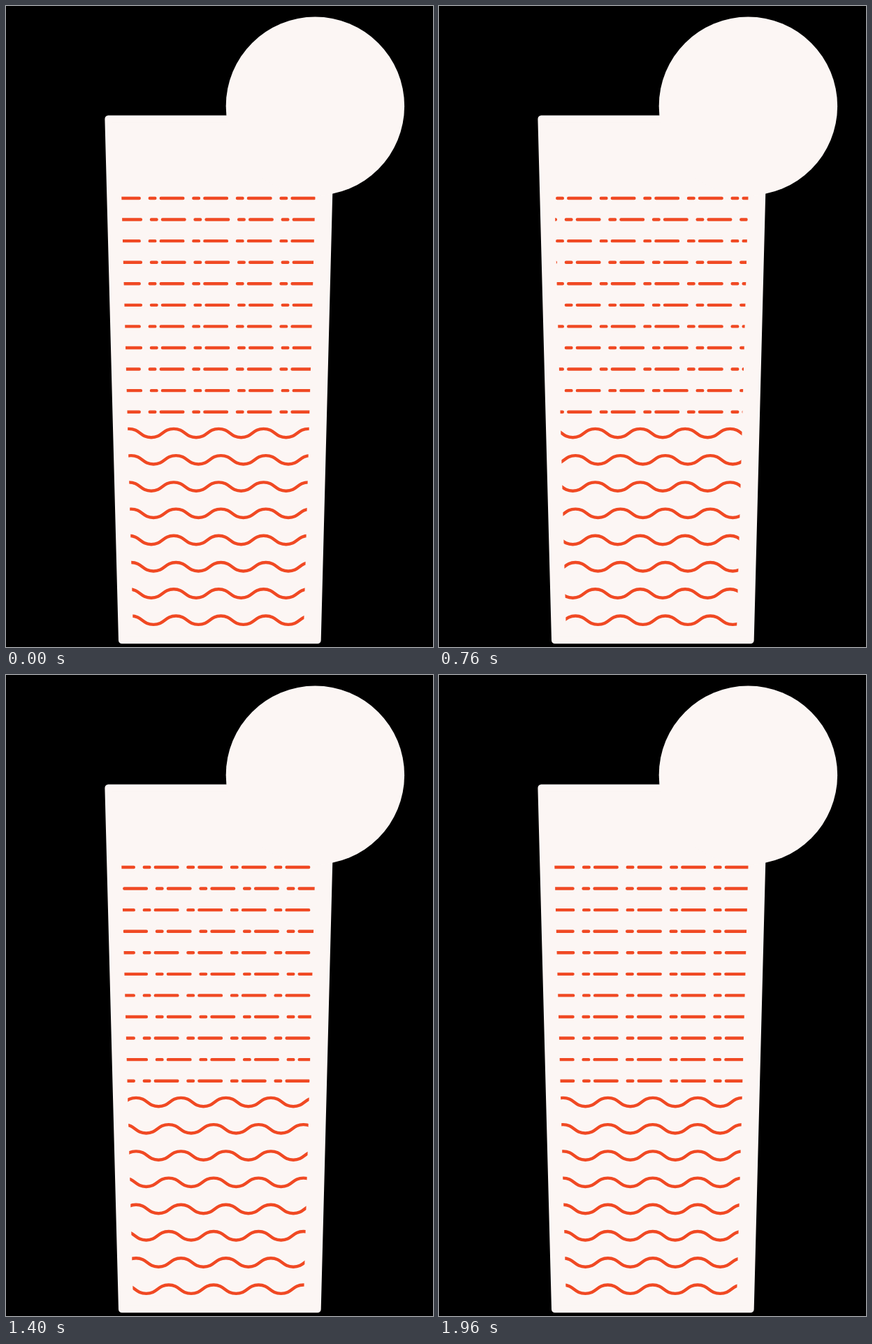
An HTML page with a canvas that plays this animation: 611x917 px, repeating every 2000 ms.

```html
<!DOCTYPE html>
<html lang="en">
<head>
<meta charset="utf-8">
<title>Fizzy glass</title>
<style>
html, body { margin: 0; width: 100%; height: 100%; overflow: hidden; background: #000; }
canvas { display: block; }
</style>
</head>
<body>
<canvas id="stage" width="611" height="917"></canvas>
<script>
const ctx = document.getElementById('stage').getContext('2d');
const CREAM = '#fcf6f4', ORANGE = '#f04923';
const LOOP = 2000, STEP = 40, WIDTH = 4.4;
const DASH = { pattern: [31.6, 15, 7.6, 8.4], period: 62.6, x: 220.65, start: 1.1, speed: 21.69 };
const WAVE = { period: 64.3, x: 241.6, start: 1.6, speed: 14.4, height: 6.2 };

function polygon(points) {
  ctx.beginPath();
  points.forEach(([x, y]) => ctx.lineTo(x, y));
  ctx.closePath();
}

function drawGlass() {
  ctx.fillStyle = ctx.strokeStyle = CREAM;
  ctx.lineJoin = 'round';
  ctx.lineWidth = 10;
  polygon([[146.4, 161.5], [465, 161.5], [445.7, 907.3], [166, 907.3]]);
  ctx.fill();
  ctx.stroke();
  ctx.beginPath();
  ctx.arc(442.4, 143.2, 127.7, 0, 2 * Math.PI);
  ctx.fill();
}

// Left end of a row: even rows run left, odd rows run right
function rowStart({ x, start, speed, period }, row, step) {
  const shift = start + speed * step;
  const pos = x + (row % 2 ? shift : -shift);
  return pos - Math.ceil((pos - 100) / period) * period;
}

function drawDashes(row, step) {
  const x = rowStart(DASH, row, step) + WIDTH / 2, y = 275 + row * 30.57;
  ctx.beginPath();
  ctx.moveTo(x, y);
  ctx.lineTo(520, y);
  ctx.setLineDash(DASH.pattern);
  ctx.stroke();
}

function drawWave(row, step) {
  const half = WAVE.period / 2, y = 611.1 + row * 38.23;
  let x = rowStart(WAVE, row, step), h = -WAVE.height;
  ctx.beginPath();
  ctx.moveTo(x, y + h);
  for (; x < 460; x += half, h = -h) {
    const mid = x + half / 2;
    ctx.bezierCurveTo(mid, y + h, mid, y - h, x + half, y - h);
  }
  ctx.setLineDash([]);
  ctx.stroke();
}

function draw(step) {
  ctx.setLineDash([]);
  ctx.fillStyle = '#000';
  ctx.fillRect(0, 0, 611, 917);
  drawGlass();
  ctx.save();
  polygon([[165.1, 265], [442.7, 265], [426.1, 890], [181.8, 890]]);
  ctx.clip();
  ctx.strokeStyle = ORANGE;
  ctx.lineWidth = WIDTH;
  ctx.lineCap = 'round';
  for (let i = 0; i < 11; i++) drawDashes(i, step);
  for (let i = 0; i < 8; i++) drawWave(i, step);
  ctx.restore();
}

const begin = performance.now();
function tick() {
  draw(Math.floor((performance.now() - begin) % LOOP / STEP));
  requestAnimationFrame(tick);
}
tick();
</script>
</body>
</html>
```
